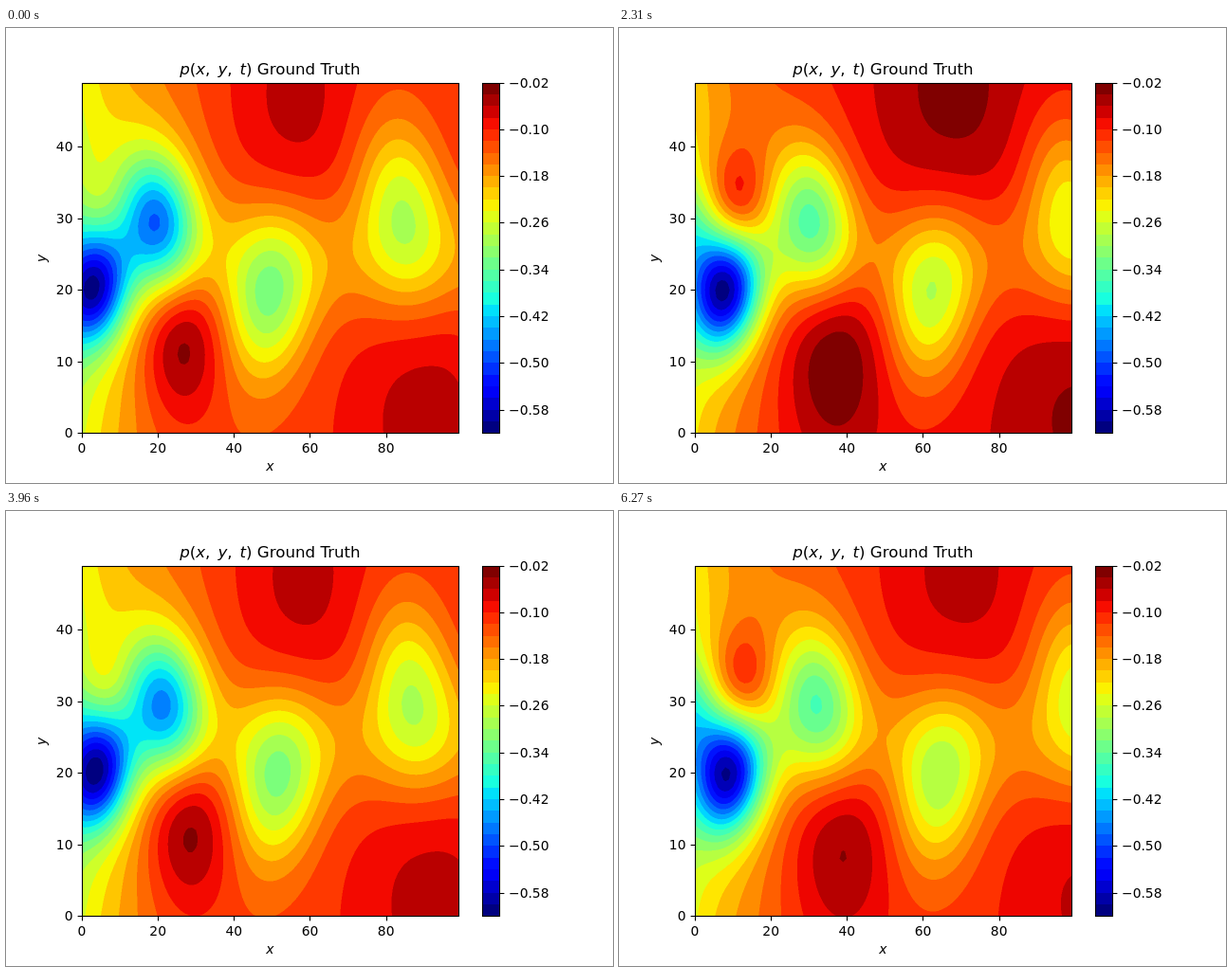
An HTML page with a canvas that plays this animation: 640x480 px, repeating every 6.6 s.

```html
<!DOCTYPE html>
<html lang="en">
<head>
<meta charset="utf-8">
<title>Pressure field</title>
<style>
html, body { margin: 0; width: 100%; height: 100%; overflow: hidden; background: #fff; }
canvas { display: block; width: 640px; height: 480px; }
</style>
</head>
<body>
<canvas id="stage" width="640" height="480"></canvas>
<script>
const ctx = document.getElementById('stage').getContext('2d');
const STEP = 330, COUNT = 20, RATE = 0.3385, START = -0.37;
const NX = 100, NY = 50, MID = 24.5;
const BOX = { x: 80, y: 57.6, w: 396.8, h: 369.6 };
const FONT = '"DejaVu Sans", sans-serif';

// Age in half periods, low: x and depth, high: x, distance from midline, strength
const LIFE = [
  [-1.4, -3, 0, 0, 8, 0],
  [-1, -2, 2.5, 1, 8, 0],
  [-0.69, -1.3, 6, 2, 8, 0.2],
  [-0.37, 3.2, 10.4, 5, 8, 1],
  [0, 8, 12.6, 11, 7.5, 4.4],
  [0.31, 13, 12.2, 18, 8, 5.8],
  [0.63, 20.3, 9.2, 26, 10.5, 4.6],
  [1, 31, 6.8, 36.5, 12.5, 3.355],
  [1.31, 39.5, 5.9, 46, 15.5, 3.05],
  [1.63, 49.2, 5.5, 56, 21, 1.9],
  [2, 62, 5.2, 68, 22.5, 1.8],
  [2.63, 84.2, 4.8, 91, 22, 1.9],
  [3, 98.5, 4.5, 101, 22, 1.5],
  [4.2, 140, 4, 142, 22, 1.4]
];

const clamp = (v, a, b) => Math.min(b, Math.max(a, v));

function stateAt(age) {
  let i = 1;
  while (i < LIFE.length - 1 && LIFE[i][0] < age) i++;
  const a = LIFE[i - 1], b = LIFE[i];
  const f = clamp((age - a[0]) / (b[0] - a[0]), 0, 1);
  return a.map((v, j) => v + (b[j] - v) * f);
}

const bell = (dx, dy, sx, sy) => Math.exp(-dx * dx / (2 * sx * sx) - dy * dy / (2 * sy * sy));

function eddies(phase) {
  const list = [];
  for (let m = Math.floor(phase) - 4; m < phase + 1.4; m++) {
    const [, x, depth, hx, off, high] = stateAt(phase - m);
    const side = m % 2 === 0 ? -1 : 1;
    const d = Math.max(x, 0);
    list.push({
      x, depth, hx, high, side,
      y: MID + side * (4.6 + 0.033 * d),
      sx: 8 - 2.3 * Math.exp(-d / 25),
      sy: 5 + 4 * (1 - Math.exp(-d / 40)),
      wide: 1.8 * Math.exp(-d / 35) * Math.min(1, depth / 10 + d / 20),
      hy: MID - side * off,
      hsx: Math.min(14.5, 4 + 0.15 * hx),
      hsy: Math.min(13, 3.2 + 0.19 * hx)
    });
  }
  return list;
}

// Depth below the top contour, in contour steps
function makeField(phase) {
  const list = eddies(phase);
  const grid = new Float32Array(NX * NY);
  for (let y = 0; y < NY; y++) {
    for (let x = 0; x < NX; x++) {
      let q = 2.3 + 2.1 * bell(0, y - MID, 1, 6.5) + 4 * Math.exp(-x / 14);
      for (const e of list) {
        const dy = y - e.y, dx = x - e.x + 0.15 * e.side * dy;
        q += e.depth * bell(dx, dy, e.sx, e.sy) + e.wide * bell(dx, dy, 12, 18);
        q -= e.high * bell(x - e.hx, y - e.hy, e.hsx, e.hsy);
      }
      grid[y * NX + x] = q;
    }
  }
  return grid;
}

function jet(t) {
  const r = t < 0.89 ? (t - 0.35) / 0.31 : 1 - (t - 0.89) / 0.22;
  const g = t < 0.5 ? (t - 0.125) / 0.25 : (0.91 - t) / 0.27;
  const b = t < 0.2 ? 0.5 + t / 0.22 : (0.65 - t) / 0.31;
  return [r, g, b].map(v => Math.round(255 * clamp(v, 0, 1)));
}

function drawField(phase) {
  const grid = makeField(phase);
  let min = Infinity, max = -Infinity;
  for (const q of grid) { min = Math.min(min, q); max = Math.max(max, q); }
  const top = Math.floor(min), n = Math.ceil(max) - top;
  const colors = Array.from({ length: n }, (_, k) => jet(1 - k / (n - 1)));

  const sample = (px, py) => {
    const gx = clamp((px - BOX.x) / BOX.w * (NX - 1), 0, NX - 1.001);
    const gy = clamp((BOX.y + BOX.h - py) / BOX.h * (NY - 1), 0, NY - 1.001);
    const ix = gx | 0, iy = gy | 0, fx = gx - ix, fy = gy - iy, i = iy * NX + ix;
    const low = grid[i] + (grid[i + 1] - grid[i]) * fx;
    const up = grid[i + NX] + (grid[i + NX + 1] - grid[i + NX]) * fx;
    return colors[clamp(Math.floor(low + (up - low) * fy) - top, 0, n - 1)];
  };

  const x0 = 80, y0 = 58, w = 397, h = 369;
  const img = ctx.createImageData(w, h);
  for (let y = 0, p = 0; y < h; y++) {
    for (let x = 0; x < w; x++, p += 4) {
      let r = 0, g = 0, b = 0;
      for (let s = 0; s < 4; s++) {
        const c = sample(x0 + x + 0.25 + 0.5 * (s & 1), y0 + y + 0.25 + 0.5 * (s >> 1));
        r += c[0]; g += c[1]; b += c[2];
      }
      img.data[p] = r / 4;
      img.data[p + 1] = g / 4;
      img.data[p + 2] = b / 4;
      img.data[p + 3] = 255;
    }
  }
  ctx.putImageData(img, x0, y0);
}

function text(str, x, y, align = 'left', style = '', size = 13.89) {
  ctx.font = `${style} ${size}px ${FONT}`;
  ctx.textAlign = align;
  ctx.fillText(str, x, y);
}

function line(x1, y1, x2, y2) {
  ctx.beginPath();
  ctx.moveTo(x1, y1);
  ctx.lineTo(x2, y2);
  ctx.stroke();
}

function drawTitle() {
  const size = 16.67, gap = 8;
  const parts = [
    ['p', 1], ['(', 0], ['x', 1], [',', 0, gap], ['y', 1], [',', 0, gap],
    ['t', 1], [')', 0], [' Ground Truth', 0]
  ];
  const style = it => it ? 'italic' : '';
  const widths = parts.map(([s, it, extra = 0]) => {
    ctx.font = `${style(it)} ${size}px ${FONT}`;
    return ctx.measureText(s).width + extra;
  });
  let x = BOX.x + BOX.w / 2 - widths.reduce((a, b) => a + b) / 2;
  parts.forEach(([s, it], i) => {
    text(s, x, 49, 'left', style(it), size);
    x += widths[i];
  });
}

function drawBar() {
  const n = 30, h = BOX.h / n;
  for (let k = 0; k < n; k++) {
    const y = Math.round(BOX.y + k * h);
    ctx.fillStyle = `rgb(${jet(1 - k / (n - 1))})`;
    ctx.fillRect(502, y, 18, Math.round(BOX.y + (k + 1) * h) - y);
  }
  ctx.fillStyle = '#000';
  ctx.strokeRect(502.5, 58.5, 18, 369);
  for (let k = 0; k < 8; k++) {
    const y = BOX.y + k * 4 * h, ty = Math.round(y) + 0.5;
    line(520.5, ty, 525.4, ty);
    text('\u2212' + (0.02 + 0.08 * k).toFixed(2), 530, Math.round(y + 5));
  }
}

function drawAxes() {
  ctx.strokeStyle = ctx.fillStyle = '#000';
  ctx.lineWidth = 1.1;
  ctx.strokeRect(80.5, 58.5, 397, 369);
  for (let v = 0; v <= 80; v += 20) {
    const x = BOX.x + v / (NX - 1) * BOX.w, tx = Math.round(x) + 0.5;
    line(tx, 427.5, tx, 432.4);
    text(v, x, 448, 'center');
  }
  for (let v = 0; v <= 40; v += 10) {
    const y = BOX.y + BOX.h - v / (NY - 1) * BOX.h, ty = Math.round(y) + 0.5;
    line(75.6, ty, 80.5, ty);
    text(v, 70.5, Math.round(y + 5), 'right');
  }
  text('x', 278.4, 467, 'center', 'italic');
  ctx.save();
  ctx.translate(42, 242.8);
  ctx.rotate(-Math.PI / 2);
  text('y', 0, 0, 'center', 'italic');
  ctx.restore();
}

let shown = -1;
const begin = performance.now();

function tick(now) {
  const n = Math.floor(Math.max(0, now - begin) / STEP) % COUNT;
  if (n !== shown) {
    shown = n;
    ctx.fillStyle = '#fff';
    ctx.fillRect(0, 0, 640, 480);
    drawField(START + RATE * n);
    drawAxes();
    drawTitle();
    drawBar();
  }
  requestAnimationFrame(tick);
}
tick(begin);
</script>
</body>
</html>
```
